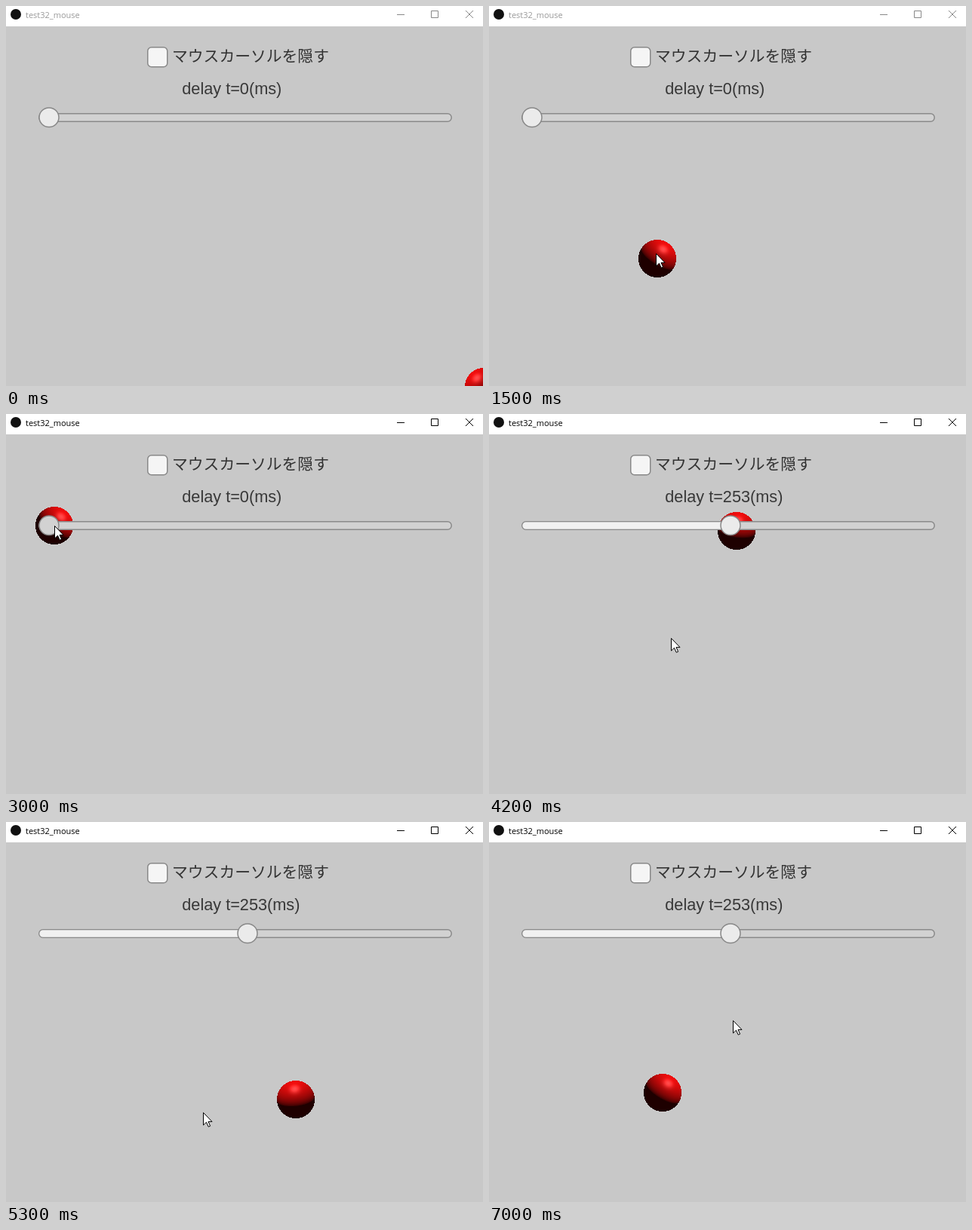
Recreate the animation shown at these times as an HTML page with a canvas. Size 632 by 504 pixels, loop 7.1 s.

```html
<!DOCTYPE html>
<html lang="ja">
<head>
<meta charset="utf-8">
<style>
html, body { margin: 0; width: 100%; height: 100%; overflow: hidden; }
canvas { display: block; }
</style>
</head>
<body>
<canvas id="stage" width="632" height="504"></canvas>
<script>
const ctx = document.getElementById('stage').getContext('2d');
const LOOP = 7100, STEP = 100;
const FOCUS = 2900, DRAG_START = 3000, DRAG_END = 3500, RELEASE = 3947;
const HANDLE_MIN = 57, HANDLE_RANGE = 520, MAX_DELAY = 500, DRAG_LENGTH = 263;
const RADIUS = 25;

// The pointer circles clockwise; a few polar waypoints: [time, angle in degrees, radius]
const swirlIn = { x: 285, y: 316, points: [
  [300, 28.5, 396], [600, 36, 137], [1000, 270, 83],
  [1500, 528.5, 65], [2250, 888, 76], [2700, 937, 278]] };
const swirlOut = { x: 305, y: 316, points: [
  [RELEASE, 278, 163], [4200, 196, 66], [4400, 193, 137],
  [5047, 393.4, 95], [5300, 482, 82], [5847, 768.6, 89],
  [6100, 930.5, 85], [6747, 1230, 86], [7000, 1369, 56]] };

const clamp = (v, lo, hi) => Math.min(hi, Math.max(lo, v));

// Cubic Hermite interpolation through unevenly spaced points
function sample(points, t, col) {
  const last = points.length - 1;
  t = clamp(t, points[0][0], points[last][0]);
  const i = Math.max(0, points.findIndex(p => p[0] >= t) - 1);
  const slope = n => {
    const a = points[Math.max(0, n - 1)], b = points[Math.min(last, n + 1)];
    return (b[col] - a[col]) / (b[0] - a[0]);
  };
  const p = points[i], q = points[i + 1], dt = q[0] - p[0], u = (t - p[0]) / dt;
  const w = u * u * (3 - 2 * u);
  return p[col] * (1 - w) + q[col] * w +
    dt * u * (1 - u) * (slope(i) * (1 - u) - slope(i + 1) * u);
}

function swirl({ x, y, points }, t) {
  const angle = sample(points, t, 1) * Math.PI / 180, r = sample(points, t, 2);
  return [x + r * Math.cos(angle), y + r * Math.sin(angle)];
}

function dragged(t) {
  const u = clamp((t - DRAG_START) / (DRAG_END - DRAG_START), 0, 1);
  return DRAG_LENGTH * u * u * (3 - 2 * u);
}

function pointerAt(t) {
  if (t < 2700) return swirl(swirlIn, t);
  if (t < RELEASE) return [64 + dragged(t), 148];
  return swirl(swirlOut, t);
}

function box(x, y, w, h, r, fill, stroke) {
  ctx.beginPath();
  ctx.roundRect(x, y, w, h, r);
  ctx.fillStyle = fill;
  ctx.fill();
  if (stroke) {
    ctx.strokeStyle = stroke;
    ctx.lineWidth = 1.5;
    ctx.stroke();
  }
}

function text(str, x, y, font, color) {
  ctx.font = font;
  ctx.fillStyle = color;
  ctx.fillText(str, x, y);
}

const normalize = v => v.map(c => c / Math.hypot(...v));
const dot = (a, b) => a[0] * b[0] + a[1] * b[1] + a[2] * b[2];

const sprite = document.createElement('canvas');
sprite.width = sprite.height = RADIUS * 2;
const spriteCtx = sprite.getContext('2d');

// Sphere with diffuse and specular light from a lamp above x = 360
function drawBall(x, y) {
  const size = RADIUS * 2, image = spriteCtx.createImageData(size, size);
  const light = normalize([clamp((360 - x) / 240, -0.7, 0.7), -0.9, 0.35]);
  const half = normalize([light[0], light[1], light[2] + 1]);
  for (let i = 0; i < size * size; i++) {
    const nx = (i % size + 0.5) / RADIUS - 1, ny = (Math.floor(i / size) + 0.5) / RADIUS - 1;
    const depth = 1 - nx * nx - ny * ny;
    if (depth < 0) continue;
    const normal = [nx, ny, Math.sqrt(depth)];
    const diffuse = Math.max(0, dot(normal, light)) ** 0.6;
    const shine = 65 * Math.max(0, dot(normal, half)) ** 30;
    image.data.set([30 + 210 * diffuse + shine, 12 * diffuse + shine, 12 * diffuse + shine, 255], i * 4);
  }
  spriteCtx.putImageData(image, 0, 0);
  ctx.drawImage(sprite, Math.round(x) - RADIUS, Math.round(y) - RADIUS);
}

function drawTitleBar(active) {
  ctx.fillStyle = '#fff';
  ctx.fillRect(0, 0, 632, 27);
  box(6, 4, 14, 14, 7, '#111');
  text('test32_mouse', 26, 16, '11px "Open Sans", sans-serif', active ? '#000' : '#999');
  ctx.strokeStyle = active ? '#000' : '#888';
  ctx.lineWidth = 1;
  ctx.stroke(new Path2D('M518 11.5h10M563.5 6.5h9v9h-9zM609 6l10 10M619 6l-10 10'));
}

function drawControls(delay, handleX, pressed) {
  box(187.75, 54.75, 26, 26, 5, '#f5f5f5', '#888');
  text('マウスカーソルを隠す', 220, 74, '500 20.8px "Noto Sans CJK JP", "Noto Sans CJK", sans-serif', '#323232');
  text(`delay t=${Math.round(delay)}(ms)`, 233.3, 117, '21.7px "Liberation Sans", Arial, sans-serif', '#383838');
  box(43.75, 142.75, 546.5, 10.5, 5.2, '#d2d2d2', '#8a8a8a');
  if (delay > 0) box(44.5, 143.5, handleX - 44, 9, 4.5, '#f1f1f1');
  box(handleX - 13, 135, 26, 25.5, 13, pressed ? '#d2d2d2' : '#ebebeb', '#888');
}

const arrow = new Path2D('M.5 .5V17L4.5 13.2L7.2 19.2L9.6 18.2L7 12.4H12Z');
function drawPointer(x, y) {
  ctx.save();
  ctx.translate(Math.floor(x), Math.floor(y));
  ctx.fillStyle = '#fff';
  ctx.fill(arrow);
  ctx.strokeStyle = '#000';
  ctx.lineWidth = 1;
  ctx.stroke(arrow);
  ctx.restore();
}

function draw(t) {
  const shift = dragged(t), delay = shift / HANDLE_RANGE * MAX_DELAY;
  ctx.fillStyle = '#c8c8c8';
  ctx.fillRect(0, 0, 632, 504);
  drawBall(...pointerAt(t - Math.max(12, delay)));
  drawControls(delay, HANDLE_MIN + shift, t >= FOCUS && t <= DRAG_END);
  drawTitleBar(t >= FOCUS);
  drawPointer(...pointerAt(t));
}

function tick() {
  draw(Math.floor(performance.now() % LOOP / STEP) * STEP);
  requestAnimationFrame(tick);
}
tick();
</script>
</body>
</html>
```
